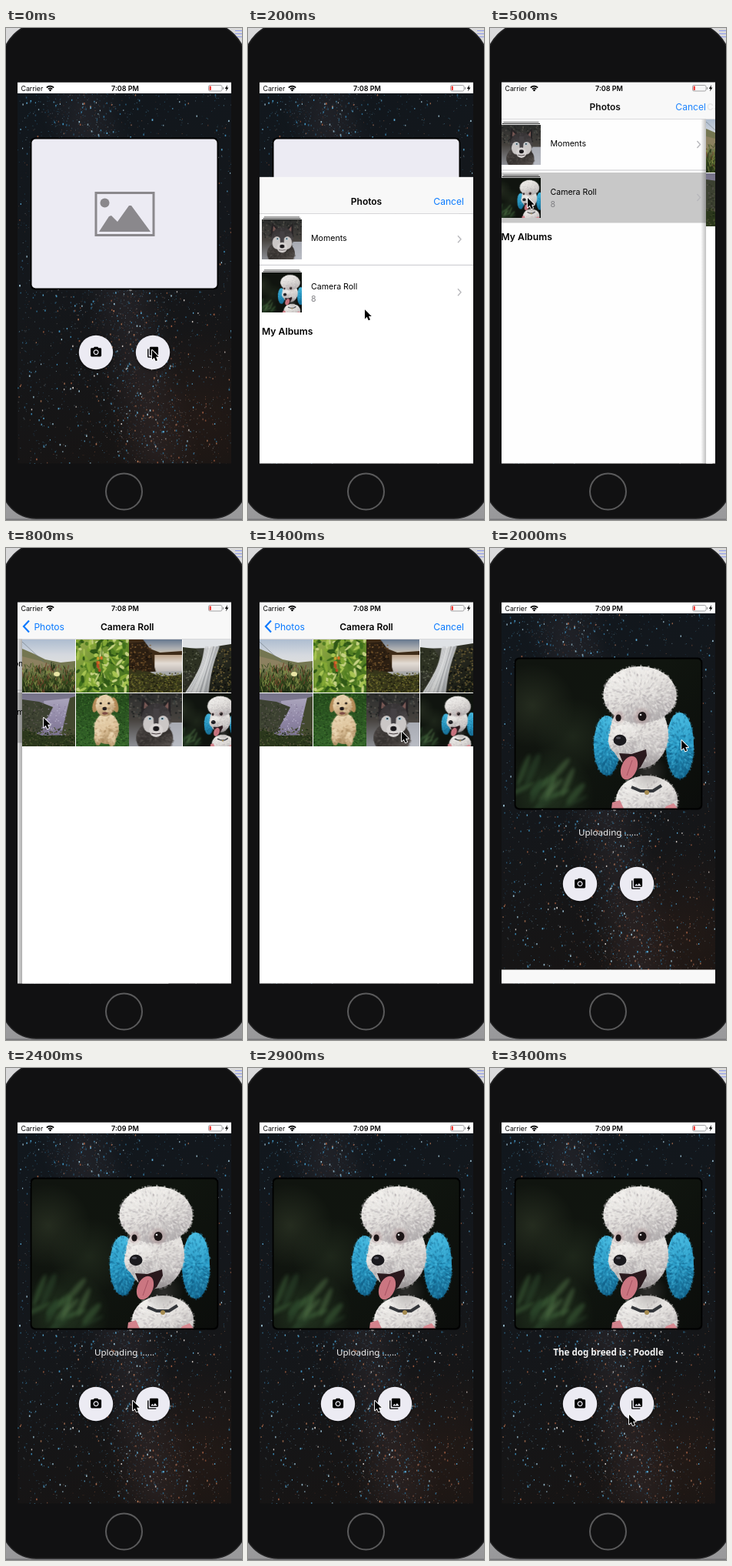
An HTML page with a canvas that plays this animation: 307 px wide and 640 px high, repeating every 3500 ms.

```html
<!DOCTYPE html>
<html lang="en">
<head>
<meta charset="utf-8">
<title>Photo picker demo</title>
<style>
html, body { margin: 0; width: 100%; height: 100%; overflow: hidden; background: #111; }
canvas { display: block; width: 307px; height: 640px; }
</style>
</head>
<body>
<canvas id="stage"></canvas>
<script>
const W = 307, H = 640, LOOP = 3500, STEP = 100;
const SX = 15, SY = 70.5, SW = 278, SH = 496;
const UI = 'Inter, "Liberation Sans", sans-serif';
const CAPTION = '11.6px "Noto Sans", "Open Sans", sans-serif';
const BLUE = '#0a7aff', PALE = '#ecebf3';
const dpr = window.devicePixelRatio || 1;
const stage = document.getElementById('stage');
stage.width = W * dpr;
stage.height = H * dpr;
let g = stage.getContext('2d');

function random(seed) {
  return () => {
    seed = (seed + 0x6d2b79f5) | 0;
    let t = Math.imul(seed ^ (seed >>> 15), 1 | seed);
    t = (t + Math.imul(t ^ (t >>> 7), 61 | t)) ^ t;
    return ((t ^ (t >>> 14)) >>> 0) / 4294967296;
  };
}
let rnd = random(7);
const pick = list => list[Math.floor(rnd() * list.length)];
const range = (a, b) => a + rnd() * (b - a);

// Drawing helpers
function rect(x, y, w, h, color) { g.fillStyle = color; g.fillRect(x, y, w, h); }
function oval(x, y, rx, ry, color, turn = 0) {
  g.fillStyle = color;
  g.beginPath();
  g.ellipse(x, y, rx, ry, turn, 0, Math.PI * 2);
  g.fill();
}
function poly(color, ...p) {
  g.fillStyle = color;
  g.beginPath();
  for (let i = 0; i < p.length; i += 2) g.lineTo(p[i], p[i + 1]);
  g.fill();
}
function line(color, width, ...p) {
  g.strokeStyle = color;
  g.lineWidth = width;
  g.beginPath();
  for (let i = 0; i < p.length; i += 2) g.lineTo(p[i], p[i + 1]);
  g.stroke();
}
function box(x, y, w, h, r) { g.beginPath(); g.roundRect(x, y, w, h, r); }
function text(s, x, y, font, color = '#000', align = 'left') {
  g.font = font;
  g.fillStyle = color;
  g.textAlign = align;
  g.textBaseline = 'alphabetic';
  g.fillText(s, x, y);
}
function shade(x0, y0, x1, y1, ...colors) {
  const s = g.createLinearGradient(x0, y0, x1, y1);
  colors.forEach((c, i) => s.addColorStop(i / (colors.length - 1), c));
  return s;
}
function glow(x, y, r, color) {
  const s = g.createRadialGradient(x, y, 0, x, y, r);
  s.addColorStop(0, color);
  s.addColorStop(1, color.slice(0, 7) + '00');
  rect(x - r, y - r, r * 2, r * 2, s);
}
// Soft fur: lit from the upper left, with fine translucent tufts
function fur(x, y, rx, ry, light, mid, dark, n) {
  oval(x, y, rx, ry, shade(x - rx * 0.4, y - ry, x + rx * 0.4, y + ry, light, mid, dark));
  g.save();
  g.globalAlpha = 0.35;
  for (let i = 0; i < n; i++) {
    const a = rnd() * 7, d = Math.sqrt(rnd()) * 1.02;
    const low = Math.sin(a) * d * 0.5 + 0.5;
    const color = rnd() < 0.25 ? mid : rnd() < low ? dark : light;
    oval(x + Math.cos(a) * rx * d, y + Math.sin(a) * ry * d, 1.9, 1.1, color, a);
  }
  g.restore();
}
function specks(n, x, y, w, h, colors, size = 1.5) {
  for (let i = 0; i < n; i++) rect(x + rnd() * w, y + rnd() * h, size, size, pick(colors));
}
function picture(w, h, seed, draw) {
  const c = document.createElement('canvas'), old = g;
  c.width = w * dpr;
  c.height = h * dpr;
  g = c.getContext('2d');
  g.scale(dpr, dpr);
  rnd = random(seed);
  draw();
  g = old;
  return c;
}

// Pictures
const sky = picture(278, 482, 3, () => {
  rect(0, 0, 278, 482, shade(0, 0, 180, 482, '#11171d', '#14171b', '#171413'));
  for (let i = 0; i < 9; i++) glow(85 + i * 12, 20 + i * 55, 55, '#4a3f4540');
  glow(235, 420, 120, '#4a2a1c38');
  const cool = ['#2f6f96', '#3f93c2', '#5fb0dc', '#2b5673', '#a5cde0'];
  const warm = ['#a25d40', '#b87a58', '#6e4638', '#d8d2cd'];
  for (let i = 0; i < 4600; i++) {
    const y = rnd() * 482;
    const band = 85 + y * 0.2 + (rnd() + rnd() + rnd() - 1.5) * 75;
    const x = rnd() < 0.45 ? band : rnd() * 278;
    const hot = rnd() < 0.15 + (x / 278) * (y / 482) * 0.6;
    const big = rnd() < 0.16;
    g.globalAlpha = big ? range(0.65, 1) : range(0.15, 0.55);
    const s = big ? range(1.1, 1.7) : 1;
    rect(x, y, s, s * (big ? 1.5 : 1), pick(hot ? warm : cool));
  }
  g.globalAlpha = 1;
});

const poodle = picture(242, 196, 11, () => {
  g.translate(-33, -143);
  rect(33, 143, 242, 196, shade(33, 143, 275, 339, '#10140f', '#10150f', '#0b0d0b'));
  glow(55, 205, 55, '#39432f80');
  glow(108, 245, 50, '#2c382680');
  glow(75, 320, 60, '#35523080');
  g.save();
  g.filter = 'blur(2px)';
  for (let i = 0; i < 16; i++)
    oval(range(32, 125), range(285, 340), range(12, 26), range(2, 5), pick(['#2a442a99', '#3f633a88', '#56794c77']), range(-1.3, -0.3));
  g.restore();
  const white = ['#f3f2ef', '#dfdcd9', '#aeaaab'];
  const aqua = ['#4bbce2', '#2a9bc6', '#125f86'];
  fur(204, 328, 40, 32, ...white, 700);
  poly('#d3838c', 159, 331, 169, 328, 174, 339, 158, 339);
  poly('#d98a92', 229, 336, 239, 332, 244, 339, 227, 339);
  fur(152, 257, 17, 39, ...aqua, 500);
  fur(247, 257, 18, 43, ...aqua, 600);
  fur(194, 242, 38, 45, ...white, 800);
  fur(195, 191, 47.5, 37, ...white, 1400);
  fur(174, 250, 20, 20, ...white, 300);
  glow(205, 292, 26, '#5d585866');
  line('#33363a', 4, 184, 311, 196, 316, 212, 316, 223, 309);
  oval(204, 318, 3, 3, '#a58b50');
  poly('#2a191d', 168, 267, 184, 268, 203, 262, 204, 270, 196, 285, 186, 293, 176, 288);
  oval(181, 286, 10, 16, '#cb7681', 0.4);
  line('#a65362', 1, 185, 276, 178, 296);
  glow(197, 219, 13, '#a98283aa');
  glow(167, 220, 10, '#a98283aa');
  oval(198, 219, 5.5, 6, '#1c1516');
  oval(167, 221, 3.6, 4.6, '#1c1516');
  oval(196, 217, 1.3, 1.3, '#ddd');
  oval(169, 250, 8.5, 7.2, '#1b1a1e');
  oval(167, 247, 3, 1.5, '#53535c');
});

const thumb = (seed, draw) => picture(69, 69, seed, draw);
const meadow = thumb(21, () => {
  rect(0, 0, 69, 69, shade(0, 0, 0, 40, '#aebdd0', '#d5d9df', '#e4e2dd'));
  poly('#747651', 0, 12, 14, 18, 30, 26, 50, 30, 69, 28, 69, 69, 0, 69);
  poly('#8c8160', 0, 22, 24, 28, 44, 36, 0, 38);
  rect(0, 40, 69, 29, shade(0, 38, 0, 69, '#5b682f00', '#3b4c1f', '#1d2b12'));
  for (let i = 0; i < 330; i++) {
    const x = rnd() * 69, y = range(36, 73);
    line(pick(['#66773a', '#33451d', '#87904a', '#72402d', '#1c2c12']), 0.9, x, y, x + range(-3, 3), y - range(3, 8));
  }
  oval(45, 45, 4, 3, '#e9e5a5');
  line('#66717a', 0.6, 0, 3, 28, 29);
});
const leaves = thumb(22, () => {
  rect(0, 0, 69, 69, shade(0, 0, 69, 69, '#9aad4e', '#678f2b', '#38631b'));
  for (let i = 0; i < 170; i++)
    oval(rnd() * 69, rnd() * 69, range(2, 7), range(1, 2.6), pick(['#83a735', '#527f22', '#a8c452', '#2f5716', '#c6d283', '#3f6f1c']), rnd() * 3);
  line('#48701f', 1.2, 35, 0, 33, 30, 37, 69);
  for (let i = 0; i < 9; i++) oval(range(28, 36), range(24, 40), 1.6, 2.2, pick(['#d57528', '#d9a12e', '#b54a25']));
});
const falls = thumb(23, () => {
  rect(0, 0, 69, 69, shade(0, 0, 0, 24, '#66788f', '#aeb0b3', '#e7cfa5'));
  poly('#3f2c18', 0, 0, 18, 0, 27, 12, 40, 17, 69, 15, 69, 46, 0, 46);
  rect(33, 20, 36, 24, shade(0, 18, 0, 44, '#b59a7d', '#e3dcd5', '#b9b3b0'));
  poly('#2c1f12', 0, 5, 20, 3, 29, 22, 35, 43, 0, 48);
  poly('#a8a9a8', 27, 42, 69, 41, 69, 48, 34, 48);
  poly('#36351a', 0, 38, 25, 42, 40, 48, 69, 46, 69, 69, 0, 69);
  specks(420, 0, 43, 69, 26, ['#5d5c26', '#1c1b0d', '#7c7631', '#3f461d']);
  specks(110, 0, 5, 28, 36, ['#5d4122', '#17110b', '#7b5a30'], 1.6);
});
const gorge = thumb(24, () => {
  rect(0, 0, 69, 69, shade(0, 0, 69, 69, '#4b4f45', '#2b2c22', '#12140f'));
  poly('#dfe2e5', 0, 0, 69, 0, 69, 5, 50, 8, 36, 11, 0, 12);
  poly('#2d3122', 0, 10, 17, 12, 27, 25, 14, 44, 0, 40);
  specks(230, 36, 9, 34, 60, ['#584c2b', '#0d0f0c', '#343721', '#6b5e37'], 1.8);
  specks(90, 0, 14, 22, 50, ['#414632', '#1d2018', '#5f6352'], 1.6);
  g.globalAlpha = 0.6;
  for (let i = 0; i < 34; i++) {
    const d = i * 0.55;
    g.strokeStyle = pick(['#f0f0f1', '#c4c6ca', '#dcdee0', '#a3a6ab']);
    g.lineWidth = 1.6;
    g.beginPath();
    g.moveTo(29 + d, 9);
    g.bezierCurveTo(26 + d * 0.9, 25, 28 + d * 0.5, 32, 4 + d * 1.6, 69);
    g.stroke();
  }
  g.globalAlpha = 1;
});
const canyon = thumb(25, () => {
  rect(0, 0, 69, 69, shade(0, 0, 0, 69, '#767389', '#8d859c', '#4b4a52'));
  poly(shade(0, 8, 0, 60, '#a9a3bb', '#9087a6', '#77708c'), 28, 10, 66, 6, 58, 30, 52, 58, 12, 60, 30, 34);
  poly('#3c4131', 0, 8, 22, 11, 40, 18, 34, 30, 22, 50, 0, 60);
  poly('#42482f', 62, 6, 69, 4, 69, 69, 50, 58, 55, 36);
  poly('#2b371c', 0, 46, 26, 55, 69, 54, 69, 69, 0, 69);
  specks(200, 0, 44, 69, 25, ['#42532a', '#1d2915', '#55513a']);
  specks(90, 0, 12, 26, 36, ['#4d523e', '#2b2f24', '#5b5551']);
  specks(70, 30, 14, 28, 40, ['#b7b0c9', '#8a7f9d'], 1.3);
});
const retriever = thumb(26, () => {
  rect(0, 0, 69, 69, shade(0, 0, 0, 69, '#254a1c', '#34642a'));
  specks(900, 0, 0, 69, 69, ['#3b702b', '#234c1b', '#4c7f36', '#1a3715'], 1.2);
  const coat = ['#eedcbb', '#dcc199', '#a98a5f'];
  fur(40, 46, 16, 20, ...coat, 160);
  fur(29, 57, 5, 11, ...coat, 40);
  fur(47, 60, 5, 9, ...coat, 40);
  oval(26, 15, 4, 10, '#b58b58', 0.25);
  oval(51, 15, 4, 10, '#b58b58', -0.25);
  fur(38, 16, 12, 14, ...coat, 110);
  oval(32.5, 13, 1.6, 1.6, '#28201a');
  oval(43, 13, 1.6, 1.6, '#28201a');
  oval(37.5, 20, 2.8, 2.2, '#211b1b');
  oval(38, 26, 3.6, 1.8, '#7f4d45');
});
const husky = thumb(27, () => {
  rect(0, 0, 69, 69, shade(0, 0, 0, 69, '#2b2c2b', '#47433f', '#8d8f95'));
  specks(130, 0, 0, 69, 32, ['#222524', '#514f49', '#393d3b'], 2.2);
  rect(52, 38, 17, 31, shade(0, 38, 0, 69, '#a8abb3', '#b9bcc4'));
  fur(33, 58, 24, 21, '#4a4543', '#35312f', '#5f5956', 180);
  poly('#262325', 15, 30, 17, 5, 31, 17, 42, 17, 54, 6, 54, 32);
  poly('#7b5a56', 19, 20, 20, 11, 27, 19);
  poly('#7b5a56', 45, 19, 51, 11, 51, 22);
  fur(35, 33, 19, 20, '#363335', '#454143', '#5d5856', 120);
  oval(26, 40, 8, 11, '#cbc7c6');
  oval(44, 40, 8, 11, '#cbc7c6');
  poly('#454144', 31, 20, 39, 20, 38, 42, 32, 42);
  oval(35, 48, 9, 9, '#d8d4d3');
  oval(27, 33, 2.3, 1.8, '#9cc4d8');
  oval(43, 33, 2.3, 1.8, '#9cc4d8');
  oval(27, 33, 1, 1, '#111');
  oval(43, 33, 1, 1, '#111');
  oval(35, 46, 4, 3.2, '#1b191c');
  line('#403638', 1, 29, 52, 35, 53, 41, 52);
});
const square = picture(69, 69, 1, () => {
  g.imageSmoothingQuality = 'high';
  g.drawImage(poodle, -8.1, 0, 85.2, 69);
});
const roll = [meadow, leaves, falls, gorge, canyon, retriever, husky, square];

const cameraIcon = new Path2D('M9 2L7.17 4H4c-1.1 0-2 .9-2 2v12c0 1.1.9 2 2 2h16c1.1 0 2-.9 2-2V6c0-1.1-.9-2-2-2h-3.17L15 2H9zm3 15c-2.76 0-5-2.24-5-5s2.24-5 5-5 5 2.24 5 5-2.24 5-5 5zM15.2 12a3.2 3.2 0 1 1-6.4 0a3.2 3.2 0 1 1 6.4 0z');
const libraryIcon = new Path2D('M22 16V4c0-1.1-.9-2-2-2H8c-1.1 0-2 .9-2 2v12c0 1.1.9 2 2 2h12c1.1 0 2-.9 2-2zm-11-4l2.03 2.71L16 11l4 5H8l3-4zM2 6v14c0 1.1.9 2 2 2h14v-2H4V6H2z');
const arrow = new Path2D('M0 0V13.2L3 10.4L5.1 15.2L7.5 14.2L5.4 9.5H9.4Z');

// Motion
function spring(t, start) {
  const x = Math.max(0, t - start) * 0.018;
  return 1 - (1 + x) * Math.exp(-x);
}
const route = [
  [0, 190, 419], [100, 188, 417], [400, 49, 221], [900, 49, 221], [1400, 200, 239],
  [1700, 259, 229], [1900, 259, 229], [2400, 165, 433], [2900, 165, 433], [3400, 181, 451]
];
function pointer(t) {
  let i = 1;
  while (i < route.length - 1 && t > route[i][0]) i++;
  const [t0, x0, y0] = route[i - 1], [t1, x1, y1] = route[i];
  const u = Math.min(1, (t - t0) / (t1 - t0)), e = u * u * (3 - 2 * u);
  return [x0 + (x1 - x0) * e, y0 + (y1 - y0) * e];
}

// Screens
function body() {
  rect(0, 0, W, H, shade(0, 0, 0, H, '#d9d9da', '#c4c4c5', '#98989a'));
  for (let y = 3; y < 14; y += 4) rect(298, y, 9, 1, '#8f9bea');
  rect(0, 638.5, W, 1.5, '#77777a');
  box(-6, -8, 319, 646, [56, 56, 45, 45]);
  g.fillStyle = '#111112';
  g.fill();
  g.strokeStyle = '#222223';
  g.lineWidth = 1.5;
  g.stroke();
  g.strokeStyle = '#5a5a5b';
  g.lineWidth = 2;
  g.beginPath();
  g.arc(153.5, 603, 23.5, 0, Math.PI * 2);
  g.stroke();
}
function button(x, y, icon) {
  g.save();
  g.shadowColor = 'rgba(0,0,0,.6)';
  g.shadowBlur = 4;
  g.shadowOffsetY = 1;
  oval(x, y, 22.2, 22.2, PALE);
  g.restore();
  g.save();
  g.translate(x - 8.3, y - 8.6);
  g.scale(0.7, 0.7);
  g.fillStyle = '#000';
  g.fill(icon);
  g.restore();
}
function caption(s, weight) { text(s, 154, 374, weight + ' ' + CAPTION, '#f1f1f1', 'center'); }
function home(t) {
  const chosen = t >= 1600;
  rect(SX, SY, SW, 14.5, '#fff');
  g.drawImage(sky, SX, 85, 278, 482);
  box(31.7, 142.5, 244.6, 198, 6);
  g.fillStyle = '#000';
  g.fill();
  g.save();
  box(33.5, 144.5, 241, 194, 5);
  g.clip();
  if (chosen) g.drawImage(poodle, 33, 143, 242, 196);
  else {
    rect(33, 144, 242, 196, PALE);
    g.strokeStyle = '#8a888c';
    g.lineWidth = 3;
    g.strokeRect(117, 214.5, 75, 55);
    oval(128.5, 227.5, 6, 6, '#8a888c');
    poly('#8a888c', 121, 265, 134, 245, 137, 244, 145, 252, 160, 231, 163, 231, 188, 265);
  }
  g.restore();
  const y = chosen ? 437 : 422;
  if (chosen) t < 3000 ? caption('Uploading ......', 500) : caption('The dog breed is : Poodle', 600);
  button(117, y, cameraIcon);
  button(191, y, libraryIcon);
}
function row(y, photo, title, count) {
  rect(21, y + 3, 46, 1, '#666');
  rect(19.5, y + 5, 49, 1, '#222');
  g.drawImage(photo, 18, y + 7, 52, 52);
  text(title, 82, y + (count ? 29 : 35), '10.6px ' + UI);
  if (count) text(count, 82, y + 45, '10.6px ' + UI, '#828286');
  line('#b9b9bd', 1.4, 273, y + 28, 277, y + 32.5, 273, y + 37);
}
function albums(t) {
  rect(SX, 118, SW, 449, '#fff');
  if (t >= 400) rect(SX, 188, SW, 65.5, '#c9c9c9');
  rect(SX, 184.5, SW, 1, '#c8c7cc');
  row(119, husky, 'Moments');
  row(188, square, 'Camera Roll', '8');
  text('My Albums', 18, 275.5, '600 12.2px ' + UI);
}
function grid() {
  rect(SX, 118, SW, 449, '#fff');
  roll.forEach((p, i) => g.drawImage(p, SX + (i % 4) * 69.6, 119 + Math.floor(i / 4) * 70, 69, 69));
}
function faded(alpha, draw) {
  g.globalAlpha = Math.max(0, Math.min(1, alpha));
  draw();
  g.globalAlpha = 1;
}
function picker(t, p) {
  const shift = (1 - p) * SW;
  if (p < 1) {
    g.save();
    g.translate(-p * SW * 0.3, 0);
    albums(t);
    g.restore();
    rect(SX, 118, SW, 449, `rgba(0,0,0,${p * 0.1})`);
  }
  if (p > 0) {
    const x = SX + shift;
    if (p < 1) rect(x - 7, 118, 7, 449, shade(x - 7, 0, x, 0, 'rgba(0,0,0,0)', 'rgba(0,0,0,.25)'));
    g.save();
    g.translate(shift, 0);
    grid();
    g.restore();
  }
  rect(SX, SY, SW, 48, '#f8f8f8');
  rect(SX, 118, SW, 0.6, '#c4c4c6');
  const x = 154 - p * 100;
  const title = '600 12px ' + UI, plain = '12.1px ' + UI;
  faded(1 - p * 1.6, () => text('Photos', x, 106.5, title, '#000', 'center'));
  faded(p * 1.6 - 0.5, () => text('Photos', x, 106.5, plain, BLUE, 'center'));
  faded(p * 1.5 - 0.4, () => line(BLUE, 2.2, 30, 94.5, 23, 102, 30, 109.5));
  faded(p * 1.1 + 0.03, () => p > 0 && text('Camera Roll', 154 + (1 - p) * 170, 106.5, title, '#000', 'center'));
  faded(p < 1 ? 1 - p * 2 : 1, () => text('Cancel', 281, 106.5, plain, BLUE, 'right'));
}
function statusBar(t) {
  text('Carrier', 19.5, 81.5, '8.8px ' + UI);
  text(t < 1600 ? '7:08 PM' : '7:09 PM', 155, 81.5, '600 9px ' + UI, '#000', 'center');
  g.strokeStyle = '#000';
  g.lineWidth = 1.7;
  for (const r of [3.6, 6.4]) {
    g.beginPath();
    g.arc(57.5, 82, r, -Math.PI * 0.76, -Math.PI * 0.24);
    g.stroke();
  }
  oval(57.5, 81, 1.3, 1.3, '#000');
  g.strokeStyle = '#8f8f91';
  g.lineWidth = 0.8;
  box(263.5, 74.5, 17.5, 7.5, 1.8);
  g.stroke();
  rect(282, 77, 1, 2.8, '#8f8f91');
  rect(264.6, 75.6, 2.2, 5.3, '#f0322c');
  poly('#000', 288, 74, 284.8, 79, 286.8, 79, 286, 82.6, 289.4, 77.4, 287.4, 77.4);
}
function cursor(t) {
  g.save();
  g.translate(...pointer(t));
  g.scale(0.93, 0.93);
  g.lineJoin = 'round';
  g.strokeStyle = '#fff';
  g.lineWidth = 2;
  g.stroke(arrow);
  g.fillStyle = '#000';
  g.fill(arrow);
  g.restore();
}

function frame(now) {
  const t = Math.floor((now % LOOP) / STEP) * STEP;
  g.setTransform(dpr, 0, 0, dpr, 0, 0);
  body();
  g.save();
  g.beginPath();
  g.rect(SX, SY, SW, SH);
  g.clip();
  home(t);
  const drop = (1 - spring(t, 50) + spring(t, 1715)) * SH;
  if (drop < SH - 6) {
    g.save();
    g.translate(0, drop < 2 ? 0 : drop);
    const p = spring(t, 482);
    picker(t, p > 0.985 ? 1 : p);
    g.restore();
  }
  statusBar(t);
  g.restore();
  cursor(t);
}
const began = performance.now();
function tick() {
  frame(performance.now() - began);
  requestAnimationFrame(tick);
}
tick();
</script>
</body>
</html>
```
